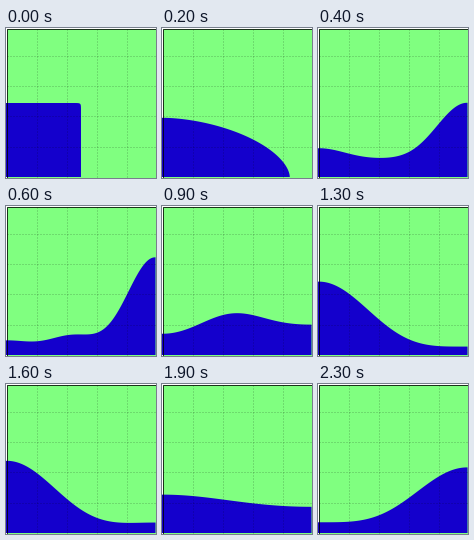
Recreate the animation shown at these times as a matplotlib script. Size 150 by 150 pixels, loop 2400 ms.

```python
import matplotlib.pyplot as plt
import numpy as np
from matplotlib.animation import FuncAnimation
from matplotlib.patches import Polygon, Rectangle

SIZE, DPI = 150, 100
PX = 72 / DPI
FRAMES, STEP_MS = 24, 100
EDGE_A, EDGE_B = 0.5, SIZE - 0.5
FLOOR, DAM = 149, 74
IMPACT = 4  # step at which the water has climbed the right wall
GREEN, BLUE = "#80ff80", "#1400cc"

u = np.linspace(0, 1, 300)


def column(t):
    """Collapsing block of water: a superellipse that widens and sinks."""
    width = DAM + 20 * t ** 1.4
    height = DAM - 3.7 * t ** 2
    power = 1.35 + 0.8 / (t + 0.014)
    a = np.pi / 2 * (1 - u)
    x = np.abs(np.cos(a)) ** (2 / power)
    y = np.abs(np.sin(a)) ** (2 / power)
    return 1 + width * x, height * y


def slosh(t):
    """Standing waves between the walls: cosine modes 0 to 4."""
    swing = (42 * np.exp(-0.012 * t) * np.tanh((t / 5) ** 3)
             * np.sin(0.305 * (t - 9.3)))
    ripple = 13 * np.cos(0.52 * (t - 4.5)) * np.exp(-(t / 13) ** 6)
    jolt = np.exp(-((t - 6) / 2) ** 2)
    modes = [34.6 - 0.14 * t,
             swing,
             0.009 * swing ** 2 + ripple,
             -10.5 * jolt,
             4.6 * jolt]
    height = sum(a * np.cos(k * np.pi * u) for k, a in enumerate(modes))
    return 1 + 148 * u, height


fig = plt.figure(figsize=(SIZE / DPI, SIZE / DPI), dpi=DPI, facecolor="white")
ax = fig.add_axes([0, 0, 1, 1])
ax.set(xlim=(0, SIZE), ylim=(SIZE, 0))
ax.axis("off")

side = EDGE_B - EDGE_A
ax.add_patch(Rectangle((EDGE_A, EDGE_A), side, side, fc=GREEN, ec="none"))
water = ax.add_patch(Polygon([(0, 0)] * 3, fc=BLUE, ec="none", zorder=2))
ax.add_patch(Rectangle((EDGE_A, EDGE_A), side, side, fc="none", ec="black",
                       lw=PX, alpha=0.8, zorder=4))

grid = dict(color="black", lw=PX, ls=(0, (1, 2)), alpha=0.28, zorder=3)
ax.vlines(np.linspace(30.5, 120.5, 4), EDGE_A, EDGE_B, **grid)
ax.hlines(np.linspace(27.5, 118.5, 4), EDGE_A, EDGE_B, **grid)


def draw(t):
    x, height = column(t) if t < IMPACT else slosh(t)
    y = FLOOR - height
    water.set_xy([(0, y[0]), *zip(x, y), (max(x[-1], EDGE_B), y[-1]),
                  (EDGE_B, FLOOR), (0, FLOOR)])
    return [water]


anim = FuncAnimation(fig, draw, frames=FRAMES, interval=STEP_MS,
                     repeat=True, repeat_delay=0)
plt.show()
```
